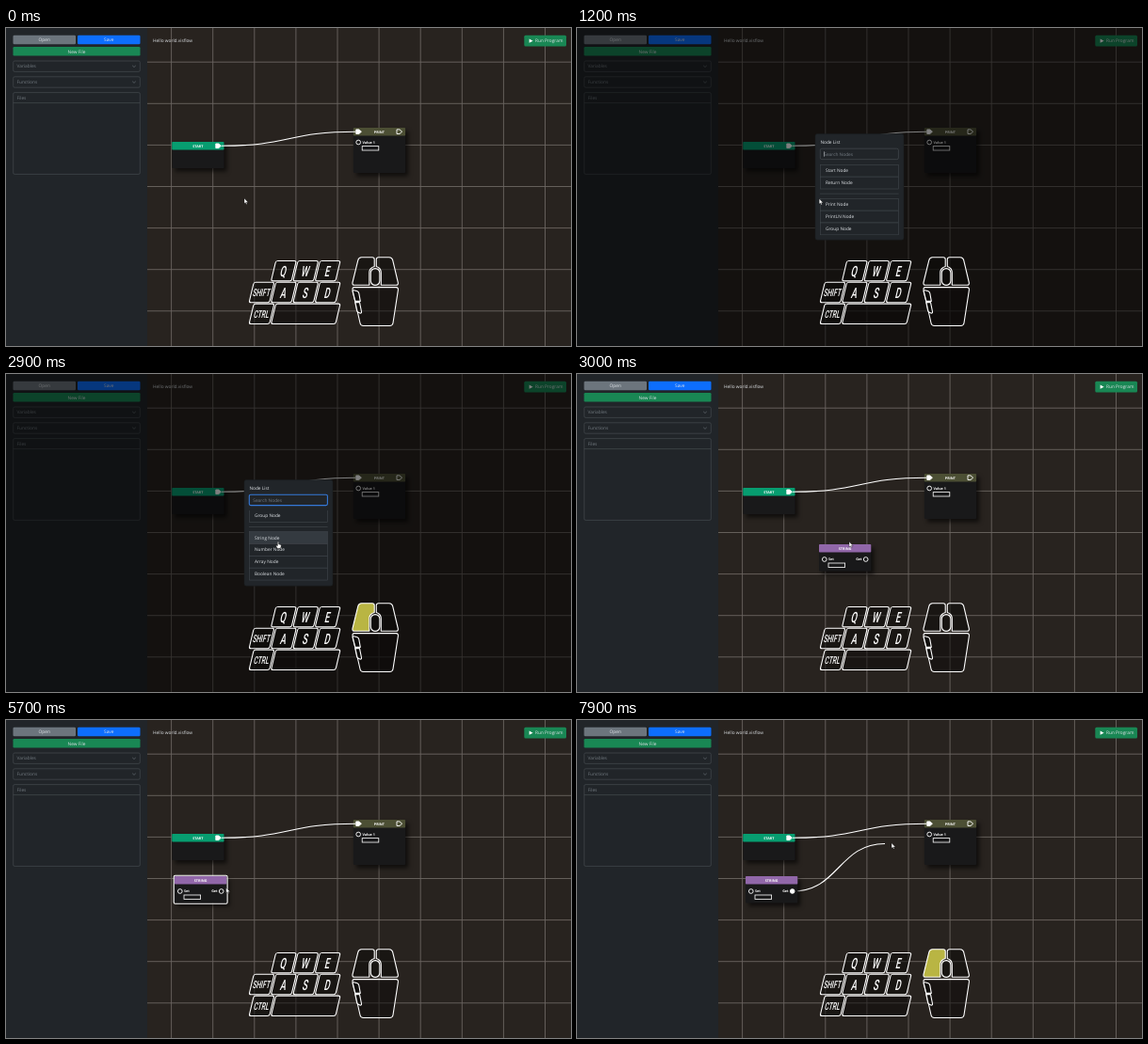
These frames come from a looping animation (600 by 338 pixels, 8 s). An HTML page:

```html
<!DOCTYPE html>
<html lang="en">
<head>
<meta charset="utf-8">
<title>Flow editor</title>
<style>
  html, body { margin: 0; width: 100%; height: 100%; overflow: hidden; background: #28231f; }
  svg { display: block; width: 100%; height: 100%; }
  text { font: 4.8px "Open Sans", "Noto Sans", sans-serif; fill: #dee2e6; text-rendering: geometricPrecision; }
  .mid { text-anchor: middle; }
  .muted { fill: #737b82; }
  .bold { font-size: 3.7px; font-weight: 700; fill: #fff; }
  .field { fill: #212529; stroke: #454b50; stroke-width: .7; }
  .port { fill: none; stroke: #fff; stroke-width: .9; }
  .full { fill: #fff; }
  .link { fill: none; stroke: #fff; stroke-width: 1.1; }
  .pad { fill: rgba(10, 9, 8, .5); stroke: #fff; stroke-width: 1.1; stroke-linejoin: round; }
  .pad.down { fill: #b9b543; }
  .cap { font-family: Roboto, "Liberation Sans", sans-serif; font-weight: 500; fill: #fff; text-anchor: middle; }
  .row { fill: #212529; stroke: #41474c; stroke-width: .6; }
  .row.hover { fill: #343a40; }
  #search.focus { stroke: #3579d8; stroke-width: 1.1; }
</style>
</head>
<body>
<svg id="stage" viewBox="0 0 600 338" preserveAspectRatio="none">
  <defs>
    <filter id="shadow" x="-20%" y="-20%" width="150%" height="160%" color-interpolation-filters="sRGB">
      <feDropShadow dx="3.2" dy="3.5" stdDeviation="2" flood-color="#000" flood-opacity=".6"/>
    </filter>
    <clipPath id="listClip"><rect x="257" y="145" width="86" height="75.3"/></clipPath>
  </defs>
  <g id="app"></g>
  <rect id="backdrop" width="600" height="338" opacity="0"/>
  <g id="modal" opacity="0"></g>
  <g id="pads" transform="translate(-.5 0)"></g>
  <g id="pointer">
    <path id="arrow" d="M0 0V5.6L1.3 4.5L2.2 6.4L3.1 6L2.3 4.2H4.1Z" fill="#fff" stroke="#000" stroke-width=".35"/>
    <path id="hand" d="M-.6 .2Q0-.4 .6 .2V2.6L2.8 3.2Q3.4 3.5 3.2 4.4L2.6 7H-.8L-2.4 4.4Q-2 3.6-.6 4.5Z" fill="#fff" stroke="#000" stroke-width=".35"/>
  </g>
</svg>
<script>
const $ = id => document.getElementById(id);
const LOOP = 8000, STEP = 100, CELL = 44.1;

const rect = (x, y, w, h, attrs = '', r = 0) =>
  `<rect x="${x}" y="${y}" width="${w}" height="${h}" rx="${r}" ${attrs}/>`;
const label = (x, y, text, cls = '') => `<text x="${x}" y="${y}" class="${cls}">${text}</text>`;
const path = (d, attrs) => `<path d="${d}" ${attrs}/>`;
const ring = (x, y, attrs = '') => `<circle cx="${x}" cy="${y}" r="2.35" class="port" ${attrs}/>`;
const flowPort = (x, y, full) =>
  path(`M${x} ${y - 2.3}h3l2.6 2.3l-2.6 2.3h-3z`, `class="port ${full ? 'full' : ''}"`);
const button = (x, y, w, color, text) =>
  rect(x, y, w, 9.5, `fill="${color}"`, 1.3) + label(x + w / 2, y + 6.5, text, 'mid');
const valueBox = (x, y) => rect(x, y, 17.6, 4.4, 'class="port" style="stroke-width:.8"');

function link(x1, y1, x2, y2) {
  const mx = (x1 + x2) / 2;
  return `M${x1} ${y1}C${mx} ${y1} ${mx} ${y2} ${x2} ${y2}`;
}

function card(height, color, title) {
  return `<g filter="url(#shadow)">${rect(0, 0, 55.3, height, 'fill="#19191a"', .8)}</g>` +
    rect(0, 0, 55.3, 8.6, `fill="${color}"`, .8) + label(27.6, 5.7, title, 'bold mid');
}

function grid() {
  let d = '';
  for (let x = 175.6; x < 600; x += CELL) d += `M${x} 0V338`;
  for (let y = 36.2; y < 338; y += CELL) d += `M150 ${y}H600`;
  return path(d, 'stroke="#6b6661" stroke-width=".9"');
}

function dropdown(y, text) {
  return rect(7.7, y, 134.6, 11.4, 'class="field"', 1.5) + label(11.5, y + 7.4, text, 'muted') +
    path(`M134.2 ${y + 4.9}l1.8 1.7l1.8-1.7`, 'fill="none" stroke="#737b82" stroke-width=".6"');
}

$('app').innerHTML =
  rect(0, 0, 600, 338, 'fill="#28231f"') + grid() +
  rect(0, 0, 150, 338, 'fill="#212529"') +
  button(7.5, 7.8, 66.5, '#6c757d', 'Open') +
  button(76, 7.8, 66.5, '#0d6efd', 'Save') +
  button(7.5, 20, 135, '#198754', 'New File') +
  dropdown(35, 'Variables') + dropdown(51.8, 'Functions') +
  rect(7.7, 68.6, 134.6, 86.8, 'class="field"', 1.5) +
  path('M7.7 79.6H142.3', 'stroke="#454b50" stroke-width=".7"') + label(11.5, 76, 'Files', 'muted') +
  label(156, 15.4, 'Hello world.visflow') +
  rect(550.3, 7.8, 44.7, 11.6, 'fill="#198754"', 1.5) +
  path('M555.6 11.6L559.6 13.7L555.6 15.8Z', 'fill="#fff"') + label(562, 15.4, 'Run Program') +
  `<g transform="translate(176.2 121)">${card(28, '#079d70', 'START')}${flowPort(46.6, 4.3, true)}</g>` +
  `<g transform="translate(368.8 105.9)">${card(48, '#4c4f34', 'PRINT')}
    ${flowPort(3, 4.3, true)}${flowPort(46.2, 4.3, false)}${ring(5.4, 15.6)}
    ${label(9.7, 17, 'Value 1', 'bold')}${valueBox(9.4, 19.7)}</g>` +
  path(link(229, 125.3, 371.5, 110.2), 'class="link"') +
  path('', 'id="wire" class="link"') +
  `<g id="stringNode">${card(28.5, '#9167a9', 'STRING')}
    ${ring(5.8, 16)}${label(10, 17.4, 'Set', 'bold')}${valueBox(10, 20)}
    ${label(45.3, 17.4, 'Get', 'bold mid')}${ring(49.7, 16, 'id="getPort"')}
    ${rect(-.8, -.8, 56.9, 30, 'id="outline" fill="none" stroke="#fff" stroke-width="1.1"', 1.5)}</g>`;
$('stringNode').querySelectorAll('.bold')[2].setAttribute('x', 42.4);

// Node list dialog
const LIST_TOP = 145.3, ROW = 12.85, GAP = 10.3, SCROLL = 62.5;
const groups = [['Start', 'Return'], ['Print', 'PrintLN', 'Group'], ['String', 'Number', 'Array', 'Boolean']];
const rowTops = [];
let listMarkup = '', rowY = LIST_TOP;
groups.forEach((names, i) => {
  if (i) {
    listMarkup += path(`M258 ${rowY + GAP / 2}H341.6`, 'stroke="#454b50" stroke-width=".6"');
    rowY += GAP;
  }
  for (const name of names) {
    listMarkup += rect(258.3, rowY, 83.1, ROW, 'class="row"') + label(264, rowY + 7.9, name + ' Node');
    rowTops.push(rowY);
    rowY += ROW;
  }
});
$('modal').innerHTML =
  rect(253, 112.6, 94, 112.6, 'fill="#212529" stroke="#191c1f" stroke-width=".5"', 2.2) +
  label(258.4, 123.4, 'Node List') +
  rect(258.3, 128.2, 83.1, 11.4, 'id="search" class="field"', 1.6) +
  label(262.3, 135.6, 'Search Nodes', 'muted') +
  path('M262.5 131.3v5.4', 'id="caret" stroke="#dee2e6" stroke-width=".5"') +
  `<g clip-path="url(#listClip)"><g id="list">${listMarkup}</g></g>`;
const rows = [...document.querySelectorAll('.row')];

// Keyboard and mouse display
function key(col, row, text, width = 21.6) {
  const x = 258.6 + col * 23.4, y = 247.5 + row * 22.8, size = text.length > 1 ? 11 : 15.5;
  return `<g transform="translate(${x} ${y + 21.4}) skewX(-13.5)">
    ${rect(0, -21.4, width, 21.4, 'class="pad"', 2)}
    <text class="cap" transform="translate(${width / 2} ${size * .36 - 10.7}) scale(.6 1)" style="font-size:${size}px">${text}</text></g>`;
}
$('pads').innerHTML =
  [...'QWE'].map((c, i) => key(i + 1, 0, c)).join('') +
  ['SHIFT', 'A', 'S', 'D'].map((c, i) => key(i, 1, c)).join('') +
  key(0, 2, 'CTRL') + key(1, 2, '', 68.4) +
  path('M378 243.7H389.5Q391.7 243.7 391.7 246V253.5Q386.3 255 386.3 260V273.3H370.5Q368 273.3 368.5 270.5L374.3 246.8Q375 243.7 378 243.7Z', 'id="leftButton" class="pad"') +
  path('M407.5 243.7H396Q393.8 243.7 393.8 246V253.5Q398.8 255 398.8 260V273.3H414.8Q417.3 273.3 416.8 270.5L411.2 246.8Q410.5 243.7 407.5 243.7Z', 'class="pad"') +
  rect(387.8, 255.6, 9.6, 17.8, 'class="pad"', 4.8) +
  path('M370.5 275.6H414.8Q417.2 275.6 416.9 278.5L411.5 313.5Q411 316.5 408 316.5H380Q377 316.5 376.5 313.5L368.6 278.5Q368 275.6 370.5 275.6Z', 'class="pad"') +
  path('M369.8 278.8L373.5 279.8Q375 280.3 375.3 282L376.8 290.4H371.3L368.6 280Q368.5 278.5 369.8 278.8Z', 'class="pad"') +
  path('M371.3 291.6H376L378 301.5Q378.2 303.6 376.3 303L374.3 302Q373.3 301.5 373 300Z', 'class="pad"');

// Pointer path: time, x, y
const route = [
  [0, 253, 181], [200, 253.3, 180.8], [300, 255, 181], [400, 256.8, 181.2], [700, 256.8, 181.2],
  [800, 257.2, 181.5], [1300, 257.2, 181.5], [1600, 272, 180], [1900, 285, 178.5], [2200, 289, 178.3],
  [3000, 289, 178.3], [3300, 290, 190], [3700, 290, 190], [3800, 268, 187.5], [3900, 254, 184],
  [4000, 243, 181.5], [4100, 235, 179.8], [4300, 223, 177], [4500, 216, 175.6], [4800, 212, 175],
  [5000, 212, 175], [5500, 232, 177.5], [5700, 233.7, 178.2], [5900, 233.5, 180], [6100, 231, 181],
  [6200, 231, 181], [6300, 227.5, 180.5], [6400, 229, 182], [6900, 229, 182], [7000, 229.6, 182.3],
  [7200, 230, 182], [7300, 236, 180], [7400, 250, 172], [7500, 272, 158], [7600, 295, 144],
  [7700, 314, 135], [7800, 327, 131.5], [7900, 334, 130.7]
];
const clamp = (v, lo, hi) => Math.min(hi, Math.max(lo, v));
const ramp = (t, from, to) => clamp((t - from) / (to - from), 0, 1);
const smooth = p => p * p * (3 - 2 * p);
function pointerAt(time) {
  const t = clamp(time, 0, LOOP);
  const i = route.findIndex(p => p[0] > t);
  if (i < 0) return route[route.length - 1].slice(1);
  const [t0, x0, y0] = route[i - 1], [t1, x1, y1] = route[i], p = (t - t0) / (t1 - t0);
  return [x0 + (x1 - x0) * p, y0 + (y1 - y0) * p];
}
const within = (t, from, to) => t >= from && t < to;
const show = (id, on) => $(id).setAttribute('visibility', on ? 'inherit' : 'hidden');
const move = (id, x, y) => $(id).setAttribute('transform', `translate(${x} ${y})`);

function draw(t) {
  const [x, y] = pointerAt(t);
  const open = within(t, 1100, 3000), wiring = t >= 7200;

  const fade = open ? ramp(t, 1000, 1200) : 0;
  $('backdrop').setAttribute('opacity', fade * .5);
  $('modal').setAttribute('opacity', fade);
  move('modal', 0, (fade - 1) * 5);
  const scroll = SCROLL * smooth(ramp(t, 1700, 2400));
  move('list', 0, -scroll);
  $('search').classList.toggle('focus', t >= 1300);
  $('caret').setAttribute('opacity', within(t, 1200, 1700) || within(t, 2200, 2700) ? 1 : 0);

  let hovering = false;
  rows.forEach((row, i) => {
    const dy = y + scroll - rowTops[i];
    const over = open && x > 258.3 && dy >= 0 && dy < ROW;
    row.classList.toggle('hover', over);
    hovering = hovering || over;
  });

  // The dragged node and wire trail the pointer by one step.
  const [nx, ny] = pointerAt(clamp(t - STEP, 3600, 4900));
  move('stringNode', nx - 33, ny - 9);
  show('stringNode', t >= 3000);
  show('outline', within(t, 3500, 7200));
  $('getPort').classList.toggle('full', wiring);
  const [wx, wy] = pointerAt(t - STEP);
  $('wire').setAttribute('d', wiring ? link(229, 182, wx, wy) : '');

  const pressed = within(t, 2800, 3000) || within(t, 3500, 5100) || wiring;
  $('leftButton').classList.toggle('down', pressed);
  move('pointer', x, y);
  show('hand', hovering);
  show('arrow', !hovering);
}

const start = performance.now();
function tick() {
  const t = Math.max(0, performance.now() - start) % LOOP;
  draw(Math.floor(t / STEP) * STEP);
  requestAnimationFrame(tick);
}
tick();
</script>
</body>
</html>
```
